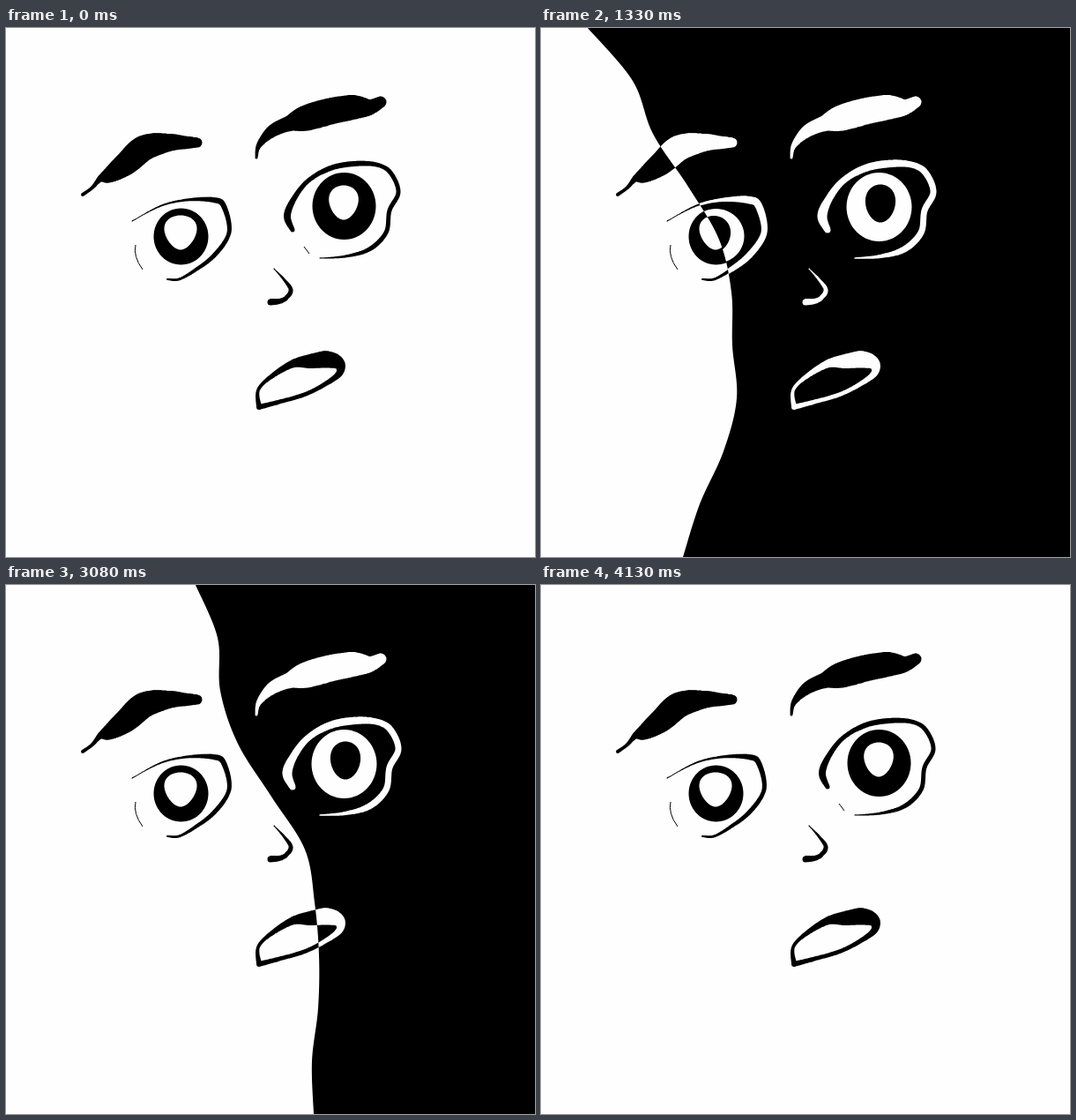
Recreate the animation shown at these times as an HTML page with a canvas. Size 600 by 600 pixels, loop 4.2 s.

```html
<!DOCTYPE html>
<html>
<head>
<meta charset="utf-8">
<style>
html, body { margin: 0; width: 100%; height: 100%; overflow: hidden; background: #fefefe; }
canvas { display: block; }
</style>
</head>
<body>
<canvas id="stage" width="600" height="600"></canvas>
<script>
const WHITE = '#fefefe', BLACK = '#000', STEP = 70, STEPS = 60;
const ctx = document.getElementById('stage').getContext('2d');

const spline = (a, b, c, d, t) =>
  b + t / 2 * (c - a + t * (2 * a - 5 * b + 4 * c - d + t * (3 * (b - c) + d - a)));

// Samples a Catmull-Rom curve through points of any dimension.
function sample(pts, detail) {
  const at = i => pts[Math.max(0, Math.min(pts.length - 1, i))];
  const out = [];
  for (let i = 0; i < pts.length - 1; i++)
    for (let k = 0; k <= detail; k++)
      out.push(pts[i].map((v, j) => spline(at(i - 1)[j], v, at(i + 1)[j], at(i + 2)[j], k / detail)));
  return out;
}

// Ink stroke through "x,y,width" points.
function brush(text, weight = 1) {
  const path = new Path2D();
  const pts = text.split(' ').map(p => p.split(',').map(Number));
  for (const [x, y, w] of sample(pts, 30)) {
    const r = Math.max(0.6, w * weight / 2);
    path.moveTo(x + r, y);
    path.arc(x, y, r, 0, 7);
  }
  return path;
}

// Ellipse that narrows downwards; turn -1 cuts a hole.
function egg(path, [cx, cy, rx, ry, taper], turn) {
  for (let k = 0; k < 60; k++) {
    const a = turn * k * Math.PI / 30;
    path.lineTo(cx + rx * Math.cos(a) * (1 - taper * Math.sin(a)), cy + ry * Math.sin(a));
  }
  path.closePath();
}

function iris(outer, pupil) {
  const path = new Path2D();
  egg(path, outer, 1);
  path.moveTo(pupil[0] + pupil[2], pupil[1]);
  egg(path, pupil, -1);
  return path;
}

const brows = [
  brush('87,189,4 98,181,4 107,171,7 117,167,17 137,153,27 157,136,29 185,130,20 206,130,14 217,130,11'),
  brush('284,147,3 287,133,6 302,117,14 322,108,18 341,102,29 370,94,30 395,90,27 412,90,18 425,84,13')
];
const plainBrows = [
  brush('90,189,2 108,169,14 130,154,25 155,141,24 185,129,15 217,129,2'),
  brush('284,138,3 305,117,14 330,107,17 360,96,23 385,91,18 410,88,12 430,80,2')
];
const lids = weight => [
  brush('143,219,1 175,202,2 205,195,3 235,195,6 247,202,6 253,232,5 236,258,5 214,275,4 196,285,3 183,285,2', weight),
  brush('325,229,5 319,213,8 327,193,6 343,173,5 368,159,6 395,154,6 420,155,5 436,164,5 445,186,5 435,207,5 431,232,5 412,251,5 385,259,3 356,261,1', weight)
];
const nose = brush('304,273,1 315,285,3 323,297,5 318,306,5 310,310,6 300,311,7');
const mouth = brush('287,430,6 286,411,4 300,396,5 325,381,9 345,378,16 365,376,19 378,381,13 377,393,7 355,408,5 335,417,5 310,424,5 287,430,6');

const lightParts = [
  ...brows, ...lids(1), nose, mouth,
  iris([198.5, 236.5, 31, 32, 0], [198, 232, 18, 19.5, 0.25]),
  iris([383.5, 202, 36, 38, 0], [383, 198, 16.5, 19.5, 0.2])
];
const darkParts = [
  ...lids(1.4), nose, mouth,
  iris([198.5, 236, 32, 31, 0], [196, 234, 19, 21, 0.1]),
  iris([383.5, 203, 37, 39, 0], [385, 199, 17, 21.5, 0.12])
];
const hairlines = new Path2D('M147 246Q144 259 155 274M338 248L344 256');

// Shadow edge: its x at every 60 px of height, at key steps.
// It sweeps left, then retraces its way.
const shift = (xs, dx) => xs.map(x => x + dx);
const corner = [434, 460, 473, 495, 533, 600, 690, 790, 890, 990, 1090];
const left = [53, 104, 127, 167, 202, 216, 217, 222, 207, 180, 161];
const edges = [
  [1, shift(corner, 175)],
  [8, corner],
  [12, [348, 358, 384, 406, 425, 456, 494, 548, 610, 670, 730]],
  [16, [215, 240, 243, 263, 301, 339, 350, 355, 354, 347, 349]],
  [19, left],
  [23, shift(left, -240)]
];

function edgeAt(step) {
  const s = Math.max(1, Math.min(23, step));
  const i = Math.max(1, edges.findIndex(([end]) => end >= s));
  const [start, from] = edges[i - 1], [end, to] = edges[i];
  const k = (s - start) / (end - start);
  return to.map((x, j) => [from[j] + (x - from[j]) * k, j * 60]);
}

function shadow(step) {
  const path = new Path2D();
  for (const [x, y] of sample(edgeAt(step), 12)) path.lineTo(x, y);
  path.lineTo(1300, 600);
  path.lineTo(1300, 0);
  path.closePath();
  return path;
}

function fill(parts, color) {
  ctx.fillStyle = color;
  for (const p of parts) ctx.fill(p);
}

function draw(now) {
  const step = Math.floor(now / STEP) % STEPS;
  ctx.fillStyle = WHITE;
  ctx.fillRect(0, 0, 600, 600);
  fill(lightParts, BLACK);
  ctx.stroke(hairlines);

  ctx.save();
  ctx.clip(shadow(Math.min(step, STEPS - step)));
  ctx.fillStyle = BLACK;
  ctx.fillRect(0, 0, 600, 600);
  fill([...(step >= 28 && step < 39 ? plainBrows : brows), ...darkParts], WHITE);
  ctx.restore();
}

const origin = performance.now();
function tick() {
  draw(performance.now() - origin);
  requestAnimationFrame(tick);
}
tick();
</script>
</body>
</html>
```
